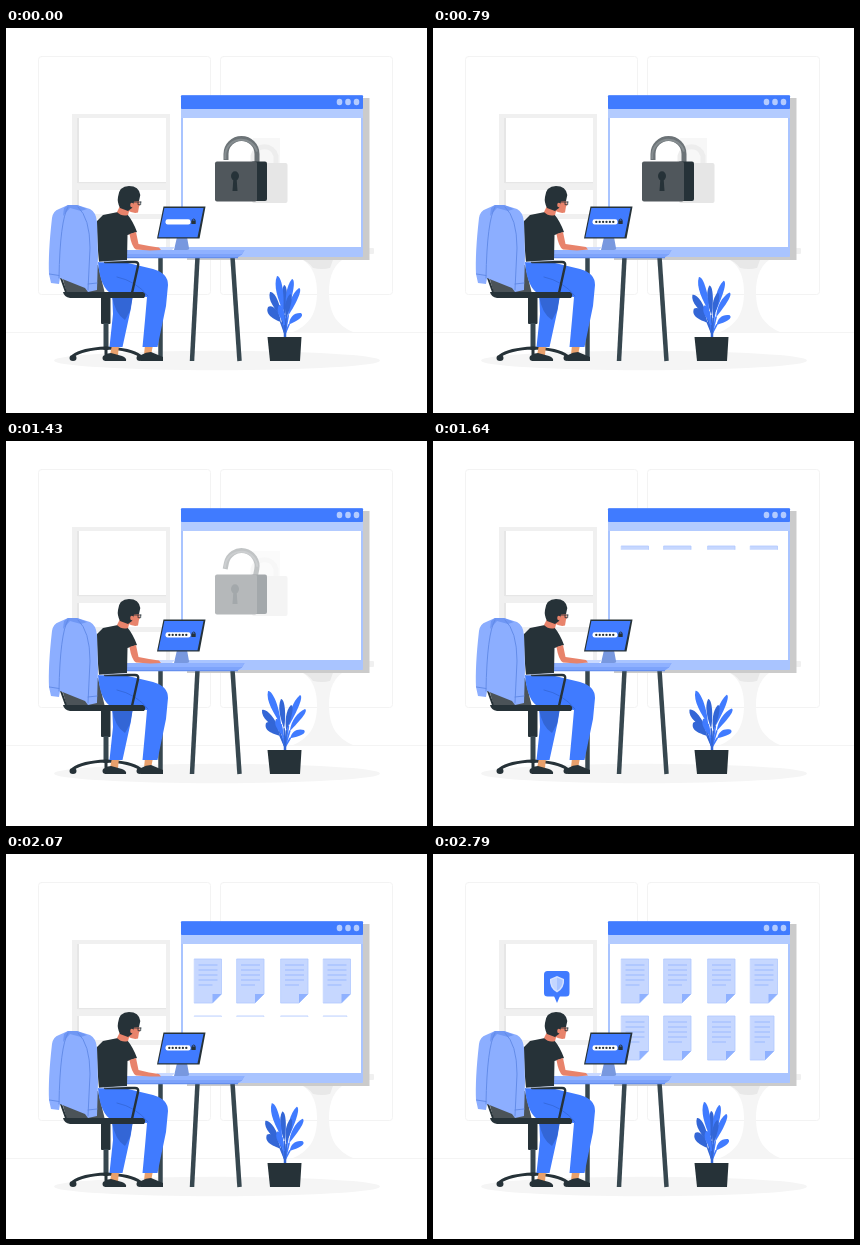
An HTML page with a canvas for the animation above (2870 ms loop, 421 by 385 pixels).

```html
<!DOCTYPE html>
<html lang="en">
<head>
<meta charset="utf-8">
<title>Unlocking files</title>
<style>
  html, body { margin: 0; width: 100%; height: 100%; overflow: hidden; background: #fff; }
  canvas { display: block; width: 421px; height: 385px; }
</style>
</head>
<body>
<canvas id="stage"></canvas>
<script>
const W = 421, H = 385, LOOP = 2870, FPS = 14, LAST_STEP = 39;
const BLUE = '#407bff', DEEP = '#3366d6', PALE = '#a9c4ff', DARK = '#263238';
const SKIN = '#e8836b', ANKLE = '#e8a06c';

const canvas = document.getElementById('stage');
const ctx = canvas.getContext('2d');
const ratio = window.devicePixelRatio || 1;
canvas.width = W * ratio;
canvas.height = H * ratio;

const clamp = v => Math.max(0, Math.min(1, v));
const progress = (t, from, to) => clamp((t - from) / (to - from));
const ease = p => p * p * (3 - 2 * p);
const mix = (a, b, p) => a + (b - a) * p;

function fill(color, path) {
  ctx.fillStyle = color;
  ctx.fill(new Path2D(path));
}

function line(color, width, path, cap = 'round') {
  ctx.strokeStyle = color;
  ctx.lineWidth = width;
  ctx.lineCap = cap;
  ctx.lineJoin = 'round';
  ctx.stroke(new Path2D(path));
}

function rect(color, x, y, w, h, r = 0) {
  ctx.fillStyle = color;
  ctx.beginPath();
  ctx.roundRect(x, y, w, h, r);
  ctx.fill();
}

function oval(color, x, y, rx, ry = rx) {
  ctx.fillStyle = color;
  ctx.beginPath();
  ctx.ellipse(x, y, rx, ry, 0, 0, Math.PI * 2);
  ctx.fill();
}

function group(draw) {
  ctx.save();
  draw();
  ctx.restore();
}

function drawRoom() {
  rect('#fff', 0, 0, W, H);
  ctx.strokeStyle = '#f3f3f3';
  ctx.lineWidth = 1;
  for (const x of [32.5, 214.5]) {
    ctx.beginPath();
    ctx.roundRect(x, 28.5, 172, 238, 3);
    ctx.stroke();
  }
  rect('#f0f0f0', 0, 304, W, 0.7);
  oval('#f5f5f5', 211, 332.5, 163, 9.7);

  rect('#f0f0f0', 66, 86, 98, 137);
  for (const [y, h] of [[90, 65], [162, 24], [191, 32]]) {
    rect('#e6e6e6', 71, y, 2, h);
    rect('#fff', 73, y, 87, h);
  }
  rect('#e6e6e6', 72, 154, 88, 1.2);

  rect('#f0f0f0', 264, 220, 104, 6, 1);
  fill('#f5f5f5', 'M291 229H341C328 235 323 248 323 264C323 286 331 297 347 304H287C303 297 311 286 311 264C311 248 306 235 291 229Z');
  fill('#e8e8e8', 'M291 229H328L324 240Q316 242 307 240Q302 233 291 229Z');
}

function drawBoard() {
  rect('#cbcbcb', 181, 70, 182.5, 162);
  rect(PALE, 175, 67.3, 182, 161.7, 1);
  rect('#b3cbff', 175, 81, 182, 9);
  rect('#fff', 177, 90, 178, 129);
  rect(BLUE, 175, 67.3, 182, 13.7, 1);
  for (const x of [333.5, 342, 350.5]) oval('#b3cbff', x, 74, 2.8, 3.2);
}

function drawLock(t) {
  const fade = progress(t, 1290, 1530);
  if (fade === 1) return;
  const swing = ease(progress(t, 1000, 1360)) * 0.2;
  rect('#f7f7f7', 247, 110, 27, 25);
  line('#ededed', 5, 'M247 135V128A12 13 0 0 1 270 128V135', 'butt');
  rect('#e6e6e6', 246, 135, 35.5, 40, 2);
  group(() => {
    ctx.translate(240, 126);
    ctx.rotate(swing);
    ctx.translate(-240, -126);
    line('#6c7377', 5, 'M220 132V126A15.5 15.5 0 0 1 251 126V134', 'butt');
    line('#868d90', 2, 'M219.3 131V126A16.2 16.2 0 0 1 251 123.5', 'butt');
  });
  rect(DARK, 245, 133.5, 16, 39.5, 2);
  rect('#50575c', 209, 133.5, 42, 40, 2);
  oval(DARK, 229, 148, 4, 4.7);
  fill(DARK, 'M227.5 149H230.5L231.5 163H226.5Z');
  // the board behind is white, so a white veil fades the whole lock evenly
  rect(`rgba(255,255,255,${fade})`, 200, 100, 90, 80);
}

function drawPage(x, y, w, reveal) {
  const h = 44, fold = 9;
  group(() => {
    ctx.beginPath();
    ctx.rect(x - 1, y - 1, w + 2, mix(1.5, h + 2, reveal));
    ctx.clip();
    const right = x + w, bottom = y + h;
    const sheet = `M${x} ${y}H${right}V${bottom - fold}L${right - fold} ${bottom}H${x}Z`;
    fill('#c6d7ff', sheet);
    line('#b0c8ff', 0.8, sheet);
    fill('#8fb1ff', `M${right} ${bottom - fold}H${right - fold}V${bottom}Z`);
    for (let i = 0; i < 5; i++) {
      rect('#9bb9ff', x + 4, y + 5.5 + i * 5, i < 4 ? w - 8 : w - 13, 1);
    }
  });
}

function drawPages(t) {
  [[105, 1571], [162, 2071]].forEach(([y, start], row) => {
    if (t < start - 5) return;
    const reveal = ease(progress(t, start, start + 430));
    [188.5, 231, 275, 317.5].forEach((x, i) => {
      drawPage(x, y, row && i === 3 ? 23.5 : 27, reveal);
    });
  });
}

// a thin stem that opens into a slim paddle towards its tip
function drawLeaf(x, y, width, shade) {
  const dx = x - 279, dy = y - 306, len = Math.hypot(dx, dy);
  const lean = dx * 0.16, neck = len * 0.38, half = width / 2;
  group(() => {
    ctx.translate(279, 306);
    ctx.rotate(Math.atan2(dy, dx));
    line(shade, 1.6, `M0 0Q${neck * 0.5} ${-lean * 0.5} ${neck} ${-lean}`);
    fill(shade, `M${neck} ${-lean}C${len * 0.6} ${-lean - half} ${len * 0.85} ${-half * 1.5} ${len} 0C${len} ${half * 1.2} ${len * 0.7} ${half * 1.2 - lean} ${neck} ${-lean}Z`);
  });
}

function drawPlant(t) {
  const spread = (1 - Math.cos(t / LOOP * Math.PI * 2)) / 2;
  // resting tip x, y, spread tip x, y, width, shade
  const leaves = [
    [278, 257, 275, 258, 6, DEEP],
    [286, 251, 294, 254, 7, BLUE],
    [293, 260, 299, 268, 7, BLUE],
    [271, 248, 262, 250, 7, BLUE],
    [264, 264, 256, 269, 7, DEEP],
    [284, 266, 285, 264, 6, DEEP],
    [262, 279, 260, 282, 9, DEEP],
    [295, 285, 298, 289, 8, BLUE],
    [273, 277, 270, 278, 6, BLUE]
  ];
  for (const [x0, y0, x1, y1, width, shade] of leaves) {
    drawLeaf(mix(x0, x1, spread), mix(y0, y1, spread), width, shade);
  }
  line(DEEP, 2.5, 'M279 297V309', 'butt');
  fill(DARK, 'M261.5 309H295.5L294 333H264Z');
}

function drawDesk() {
  line('#37474f', 4.5, 'M154.5 229V332', 'butt');
  line('#37474f', 4.5, 'M191.5 229L186 333', 'butt');
  line('#37474f', 4.5, 'M226.5 229L233.5 333', 'butt');
  fill('#7da3fb', 'M117 222H238.5L236 226.5L231 230H113Z');
  fill('#8fb1ff', 'M117 222H238.5L236 226H116Z');
  rect('#658fee', 114, 229, 118, 1.2);
}

function drawMonitor(t) {
  fill('#7898df', 'M171 209H181L183 220Q184 222 179 222H168Z');
  fill('#c9d9ff', 'M151 219H169L166 222H149Z');
  fill(DARK, 'M157.5 178.5H199.5L193.5 210.5H151Z');
  fill(BLUE, 'M158.4 180H197.5L191.5 209.2H152.4Z');
  rect('#fff', 159.5, 191.2, 25, 5.3, 2.2);
  rect(DARK, 185.3, 192.4, 4.4, 3.6, 0.6);
  line(DARK, 0.9, 'M186.3 192.5V191.7Q188 190.2 189 191.7V192.5');
  const typed = Math.min(6, Math.floor(progress(t, 0, 643) * 6.45));
  for (let i = 0; i < typed; i++) oval(DARK, 163.3 + i * 3.4, 193.9, 1.15);
}

function drawChair() {
  fill('#4b5358', 'M54 241L61 266H99L92 237Z');
  line(DARK, 2, 'M55 250L61 267');
  rect(DARK, 95, 269, 9.5, 27, 1);
  rect('#37474f', 97.5, 295, 5, 27);
  line(DARK, 3, 'M67 328Q76 321 100 320Q125 321 134 328');
  line(DARK, 3, 'M100 320V331');
  for (const x of [67, 100, 134]) oval(DARK, x, 330, 3.5, 3);
}

function drawJacket() {
  fill('#8caeff', 'M46 190Q47 183 53 181L62 177H71L84 181Q90 184 91 194L92 228L91 262L82 264L79 260L54 250L53 256L45 255L43 246Q42 225 46 190Z');
  fill('#6f97f4', 'M62 177H71L81 181L75 183L64 180L57 188L58 180Z');
  line('#5f88e6', 0.9, 'M62 179Q54 192 53 250M43.5 246L53 247.5M72 179Q84 190 84 220L82 262M82 256L91 255');
}

function drawPerson(t) {
  // far leg
  fill(ANKLE, 'M106 317H113L112 327H104Z');
  fill(DARK, 'M99 326L105 325L116 328Q121 330 120 333H99Z');
  fill(BLUE, 'M106 262H127L125 280L116.5 319H103.5L107 286Z');
  fill(DEEP, 'M106 268H127L124 283L119 292Q109 286 106 268Z');
  // near leg
  fill(ANKLE, 'M139 317H147L145 327H138Z');
  fill(DARK, 'M135 327Q140 324 145 324L157 329V333H135Z');
  fill(BLUE, 'M92 234L122 235L147 241Q162 245 162 257L160 278L151.5 319H136.5L139 292L141 269L106 266Q94 260 92 234Z');
  line(DEEP, 0.8, 'M111 249Q130 253 142 268');
  // seat and armrest
  fill(DARK, 'M57 264H137Q141 266 138 270H64Q58 269 57 264Z');
  line(DARK, 2.4, 'M99 234H129Q133 234 132 238L126 265');
  // torso and neck
  fill(DARK, 'M97 187L112 184L121 186Q127 193 131 204L121.5 207L121 232L93 234Q91 215 91 193Z');
  line('#d7e3ff', 0.7, 'M93 234L120 232.5');
  fill(SKIN, 'M114 178L124 180L122 187Q116 189 111 184Z');
  // arm, with a light typing motion in the hand
  const tap = Math.sin(t / LOOP * Math.PI * 20) * 0.5;
  fill(SKIN, `M123.5 206L130 204L132.5 216L143 ${218 + tap}L153 ${219.5 + tap}L155 ${222 + tap}L144 222.5L130 221.5Q125.5 219 123.5 206Z`);
  // head
  fill(SKIN, 'M122 170H132.5L134 177L133 178.5L132 184.5Q127 186 121 182Z');
  fill(DARK, 'M112 169Q113 158 123 158Q133 158 134.3 167L133 173L128 173.5L126 180L122 183L114 180Q111 174 112 169Z');
  oval(SKIN, 125.8, 177, 1.6, 2.2);
  line(DARK, 0.8, 'M127 174H135M132 174V176.7H134.7V174');
}

function drawBubble(t) {
  const grow = ease(progress(t, 2357, 2680));
  if (!grow) return;
  group(() => {
    ctx.translate(124, 149);
    ctx.scale(grow, grow);
    ctx.translate(-124, -149);
    rect(BLUE, 111, 117, 25.5, 25.5, 3.5);
    fill(BLUE, 'M121 142H127L124 149Z');
    fill('#d5e2ff', 'M124 122L131 125Q132 134 124 138.5Q116 134 117 125Z');
    fill('#a9c4ff', 'M124 123.5L129.7 126Q130 133 124 136.8Z');
    fill('#c4d6ff', 'M124 123.5L118.3 126Q118 133 124 136.8Z');
  });
}

function drawScene(t) {
  ctx.setTransform(ratio, 0, 0, ratio, 0, 0);
  drawRoom();
  drawBoard();
  drawLock(t);
  drawPages(t);
  drawPlant(t);
  drawDesk();
  drawMonitor(t);
  drawChair();
  drawPerson(t);
  drawJacket();
  drawBubble(t);
}

const startOf = step => Math.round(step * 100 / FPS) * 10;

function stepAt(t) {
  let step = Math.min(LAST_STEP, Math.ceil(t * FPS / 1000));
  while (step > 0 && startOf(step) > t) step--;
  return step;
}

const began = performance.now();

function tick() {
  const t = (performance.now() - began) % LOOP;
  drawScene(stepAt(t) * 1000 / FPS);
  requestAnimationFrame(tick);
}

tick();
</script>
</body>
</html>
```
